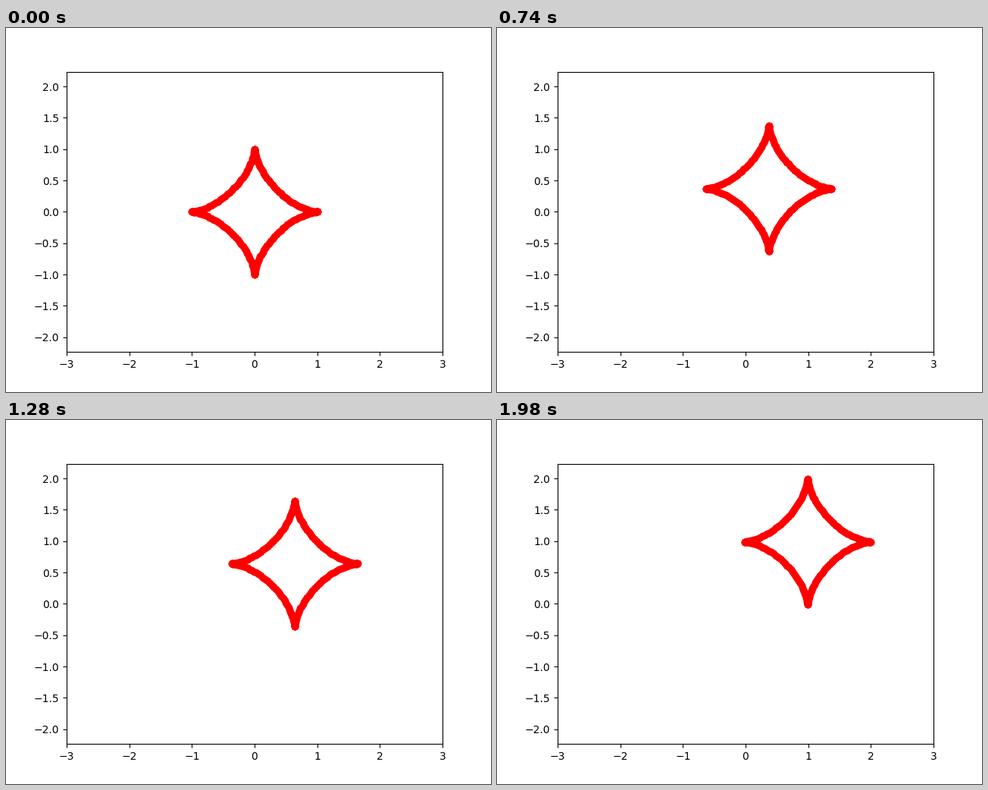
A matplotlib script for the animation above (2000 ms loop, 640x480 px).

```python
import numpy as np
import matplotlib.pyplot as plt
from matplotlib.animation import FuncAnimation

FRAMES = 100
STEP = 0.01  # shift along both axes per frame

fig, ax = plt.subplots(figsize=(6.4, 4.8), dpi=100)
ax.set_xlim(-3, 3)
# Equal scale on both axes for the default axes box
box = ax.get_position()
half = 3 * (box.height * 4.8) / (box.width * 6.4)
ax.set_ylim(-half, half)

angle = np.linspace(0, 2 * np.pi, 200)
astroid_x, astroid_y = np.cos(angle) ** 3, np.sin(angle) ** 3
curve, = ax.plot(astroid_x, astroid_y, "o", color="red")


def update(frame):
    shift = STEP * frame
    curve.set_data(astroid_x + shift, astroid_y + shift)
    return curve,


anim = FuncAnimation(fig, update, frames=FRAMES, interval=20,
                     repeat=True, repeat_delay=0)
plt.show()
```
